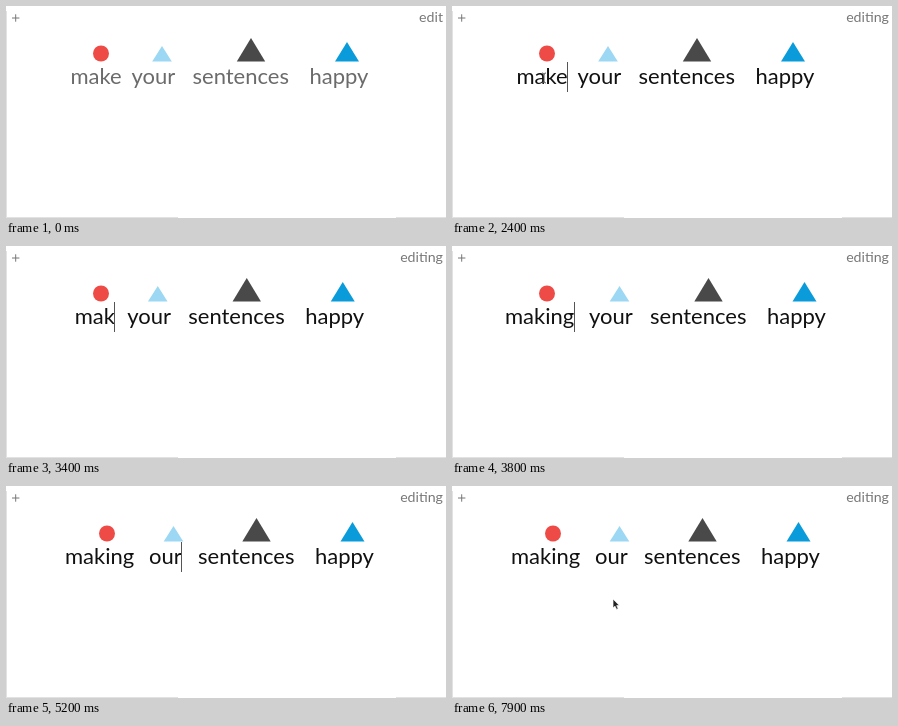
Animation, 440 px wide and 212 px high, one loop 8 s. Source, as an HTML page:

```html
<!DOCTYPE html>
<html lang="en">
<head>
<meta charset="utf-8">
<title>Happy sentences</title>
<style>
  html, body { margin: 0; width: 100%; height: 100%; overflow: hidden; background: #fff; }
  svg { display: block; width: 440px; height: 212px; }
  text { font-family: Lato, "Open Sans", sans-serif; white-space: pre; }
  .word { font-size: 22px; }
  #mode { font-size: 14.2px; fill: #777; text-anchor: end; }
</style>
</head>
<body>
<svg viewBox="0 0 440 212">
  <rect width="440" height="212" fill="#fff"/>
  <path d="M.5 5V212M0 211.5H172M390 211.5H440" stroke="#e2e2e2" fill="none"/>
  <path d="M6 12H13.4M9.7 8.3V15.7" stroke="#777" fill="none"/>
  <text id="mode" x="437" y="16"></text>
  <rect id="selection" y="55" height="32" fill="#b4d6fb"/>
  <g id="row"></g>
  <path id="caret" d="M0 56V86" stroke="#555" fill="none"/>
  <g id="arrow"><path d="M0 0V9L2 7.2L3.6 10.4L5.2 9.6L3.7 6.6H6.4Z" fill="#222" stroke="#fff" stroke-width=".7"/></g>
  <g id="beam"><path d="M-2 -5Q0 -5 0 -3.5Q0 -5 2 -5M0 -4V4M-2 5Q0 5 0 3.5Q0 5 2 5" fill="none" stroke="#555"/></g>
</svg>
<script>
const LOOP = 8000, STEP = 100, CENTER = 221.5, BASELINE = 78;
const $ = id => document.getElementById(id);

// Width of the cell each word occupies
const CELL = {
  make: 61, m: 30.5, ma: 42, mak: 52.5, makin: 71.5, making: 84,
  your: 61, o: 29, ou: 41, our: 49, sentences: 117, happy: 75
};

// [time, value] steps
const FIRST = [[0, "make"], [3100, "m"], [3300, "ma"], [3400, "mak"], [3600, "makin"], [3800, "making"]];
const SECOND = [[0, "your"], [4900, "o"], [5100, "ou"], [5200, "our"]];
// Index of the word holding the caret or the selection, -1 for none
const CARET = [[0, -1], [2400, 0], [2500, -1], [3200, 0], [4100, -1], [4500, 1], [4600, -1],
  [4900, 1], [5800, -1], [6300, 1], [6700, -1], [7200, 1], [7700, -1]];
const SELECTED = [[0, -1], [2500, 0], [3100, -1], [4600, 1], [4900, -1]];
const POINTER = [[0, ""], [100, "arrow"], [1500, "beam"], [1600, "arrow"], [2200, "beam"], [3100, ""],
  [4100, "beam"], [4900, ""], [5500, "beam"], [5600, "arrow"]];
// [time, x, y], linear in between
const PATH = [[100, 245, 203], [400, 335, 112], [700, 408, 28], [900, 424, 3], [1000, 425, 2], [1300, 423, 2],
  [1500, 423, 8], [1700, 340, 55], [1900, 205, 110], [2000, 150, 113], [2200, 96, 82], [2300, 92, 72],
  [3100, 92, 72], [4100, 100, 72], [4400, 158, 72], [5500, 160, 74], [5700, 167, 118], [6000, 170, 155],
  [7600, 170, 155], [7700, 168, 143], [7800, 163, 121], [7900, 161, 113]];

const triangle = (half, top) => `<path d="M0 ${top}L${half} 55.5H${-half}Z" `;
const SHAPES = [
  '<circle cy="47.5" r="8" fill="#ee4b46"/>',
  triangle(9.8, 40) + 'fill="#9cd7f3"/>',
  triangle(14.2, 32) + 'fill="#494949"/>',
  triangle(12, 36) + 'fill="#0a9bdb"/>'
];

$("row").innerHTML = SHAPES.map(s => `<g>${s}</g><text class="word" y="${BASELINE}"></text>`).join("");
const marks = [...$("row").querySelectorAll("g")];
const labels = [...$("row").querySelectorAll("text")];

const at = (steps, t) => steps.filter(s => s[0] <= t).pop()[1];
const show = (el, on) => el.style.display = on ? "" : "none";
const move = (el, x, y = 0) => el.setAttribute("transform", `translate(${x} ${y})`);

function along(path, t) {
  const i = path.findIndex(p => p[0] > t);
  if (i === 0) return path[0].slice(1);
  if (i < 0) return path[path.length - 1].slice(1);
  const [t0, x0, y0] = path[i - 1], [t1, x1, y1] = path[i];
  const k = (t - t0) / (t1 - t0);
  return [x0 + (x1 - x0) * k, y0 + (y1 - y0) * k];
}

function draw(t) {
  const editing = t >= 1500;
  const words = [at(FIRST, t), at(SECOND, t), "sentences", "happy"];
  const caret = at(CARET, t), selected = at(SELECTED, t);
  let x = CENTER - words.reduce((sum, w) => sum + CELL[w], 0) / 2;

  $("mode").textContent = editing ? "editing" : "edit";
  show($("caret"), caret >= 0);
  show($("selection"), selected >= 0);

  words.forEach((word, i) => {
    const label = labels[i];
    label.textContent = word;
    label.setAttribute("x", x);
    label.setAttribute("fill", editing ? "#111" : "#6b6b6b");
    move(marks[i], x + CELL[word] / 2);
    const width = label.getComputedTextLength();
    if (i === caret) move($("caret"), Math.floor(x + width) + .5);
    if (i === selected) {
      $("selection").setAttribute("x", x);
      $("selection").setAttribute("width", width);
    }
    x += CELL[word];
  });

  const kind = at(POINTER, t);
  for (const name of ["arrow", "beam"]) {
    show($(name), name === kind);
    move($(name), ...along(PATH, t));
  }
}

const start = performance.now();
function tick() {
  const t = (performance.now() - start) % LOOP;
  draw(Math.floor(t / STEP) * STEP);
  requestAnimationFrame(tick);
}
tick();
</script>
</body>
</html>
```
